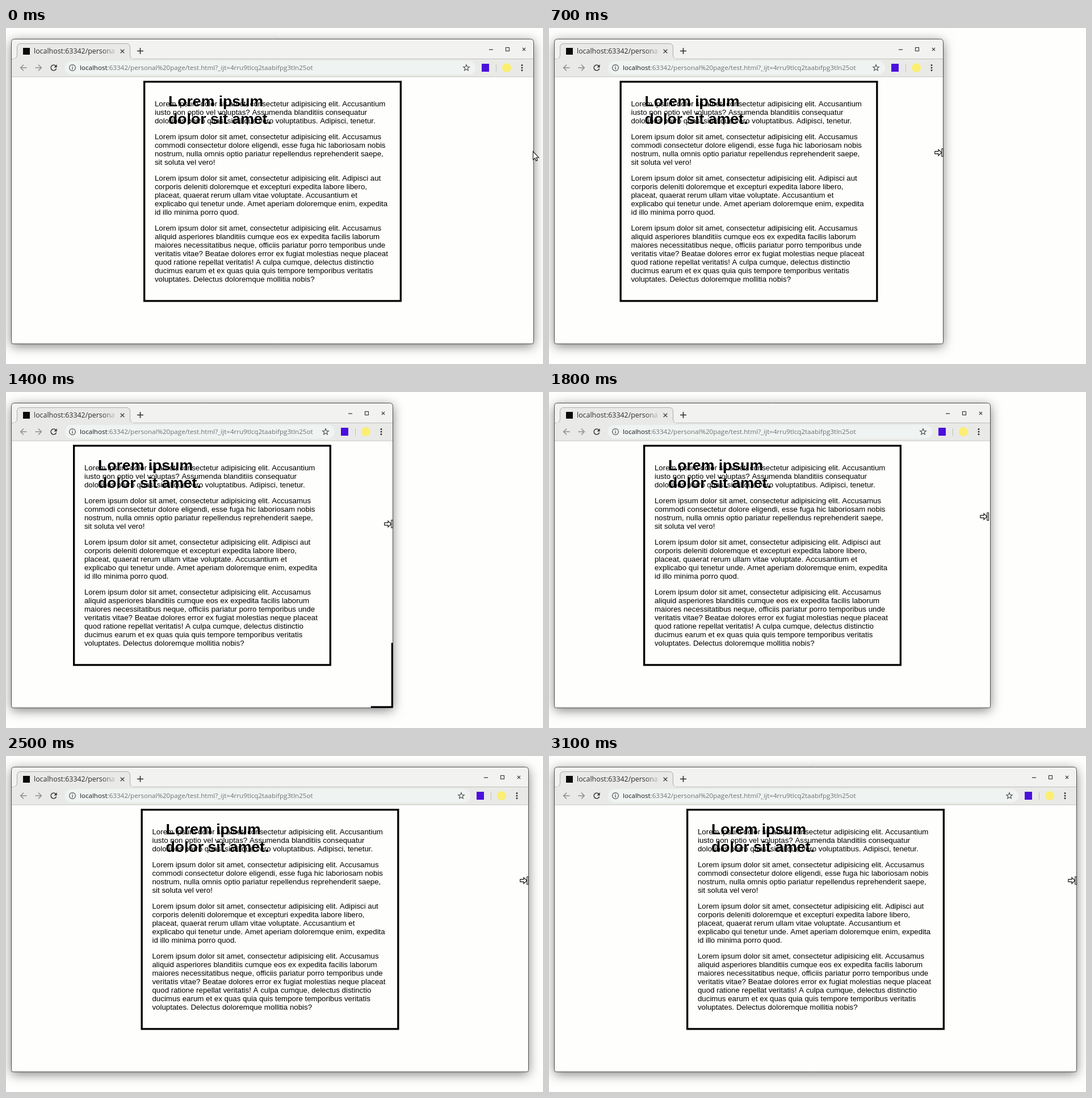
Recreate the animation shown at these times as an HTML page with a canvas. Size 946 by 592 pixels, loop 3500 ms.

```html
<!DOCTYPE html>
<html lang="en">
<head>
<meta charset="utf-8">
<title>Resizing a browser window</title>
<style>
html, body { margin: 0; width: 100%; height: 100%; overflow: hidden; background: #fefefd; }
canvas { display: block; }
</style>
</head>
<body>
<canvas id="stage" width="946" height="592"></canvas>
<script>
const c = document.getElementById('stage').getContext('2d');
const LOOP = 3500, STEP = 100;
const LEFT = 10, TOP = 20, BOTTOM = 556;
const ZOOM = 0.832;
const UI = '"Open Sans", "Noto Sans", sans-serif';
const BODY = '"Liberation Sans", Arial, sans-serif';

// Key points of the drag: time, right edge of the window, pointer height
const drag = [
  [400, 930, 219], [700, 695, 219], [1000, 595, 228], [1100, 577, 232],
  [1200, 577, 232], [1400, 682, 232], [1800, 778, 219], [2200, 888, 215],
  [2500, 921, 219], [2700, 926, 219], [2800, 926, 219], [3100, 930, 219]
];

const paragraphs = [
  ['Lorem ipsum dolor sit amet, consectetur adipisicing elit. Accusantium',
   'iusto non optio vel voluptas? Assumenda blanditiis consequatur',
   'doloribus porro quasi similique vero voluptatibus. Adipisci, tenetur.'],
  ['Lorem ipsum dolor sit amet, consectetur adipisicing elit. Accusamus',
   'commodi consectetur dolore eligendi, esse fuga hic laboriosam nobis',
   'nostrum, nulla omnis optio pariatur repellendus reprehenderit saepe,',
   'sit soluta vel vero!'],
  ['Lorem ipsum dolor sit amet, consectetur adipisicing elit. Adipisci aut',
   'corporis deleniti doloremque et excepturi expedita labore libero,',
   'placeat, quaerat rerum ullam vitae voluptate. Accusantium et',
   'explicabo qui tenetur unde. Amet aperiam doloremque enim, expedita',
   'id illo minima porro quod.'],
  ['Lorem ipsum dolor sit amet, consectetur adipisicing elit. Accusamus',
   'aliquid asperiores blanditiis cumque eos ex expedita facilis laborum',
   'maiores necessitatibus neque, officiis pariatur porro temporibus unde',
   'veritatis vitae? Beatae dolores error ex fugiat molestias neque placeat',
   'quod ratione repellat veritatis! A culpa cumque, delectus distinctio',
   'ducimus earum et ex quas quia quis tempore temporibus veritatis',
   'voluptates. Delectus doloremque mollitia nobis?']
];

// Linear interpolation of one column of the drag keys
function dragAt(t, column) {
  const next = drag.findIndex(key => key[0] > t);
  if (next === 0) return drag[0][column];
  if (next < 0) return drag.at(-1)[column];
  const a = drag[next - 1], b = drag[next];
  return Math.round(a[column] + (b[column] - a[column]) * (t - a[0]) / (b[0] - a[0]));
}

// The pointer first trails, then leads the edge while the window grows
function pointerLead(t) {
  const p = (t - 1400) / 1000;
  return p > 0 && p < 1 ? Math.round(-5 * Math.sin(p * Math.PI * 2)) : 0;
}

function rect(x, y, w, h, color) {
  c.fillStyle = color;
  c.fillRect(x, y, w, h);
}

function text(str, x, y, font, color) {
  c.font = font;
  c.fillStyle = color;
  c.fillText(str, x, y);
}

function line(color, width, ...pts) {
  c.beginPath();
  pts.forEach(([x, y]) => c.lineTo(x, y));
  c.strokeStyle = color;
  c.lineWidth = width;
  c.stroke();
}

function polygon(pts, fill, stroke, width = 1) {
  c.beginPath();
  pts.forEach(([x, y]) => c.lineTo(x, y));
  c.closePath();
  if (fill) { c.fillStyle = fill; c.fill(); }
  if (stroke) { c.strokeStyle = stroke; c.lineWidth = width; c.stroke(); }
}

function disc(x, y, r, color) {
  c.beginPath();
  c.arc(x, y, r, 0, Math.PI * 2);
  c.fillStyle = color;
  c.fill();
}

function cross(x, y, r, color, width) {
  line(color, width, [x - r, y - r], [x + r, y + r]);
  line(color, width, [x - r, y + r], [x + r, y - r]);
}

function outline(right) {
  c.beginPath();
  c.roundRect(LEFT - 0.5, TOP - 0.5, right - LEFT, BOTTOM - TOP + 1, [5, 5, 3, 3]);
}

function drawFrame(right) {
  c.save();
  c.shadowColor = 'rgba(0,0,0,0.5)';
  c.shadowBlur = 19;
  c.shadowOffsetY = 4;
  outline(right);
  c.fillStyle = '#fefefd';
  c.fill();
  c.restore();

  c.save();
  outline(right);
  c.clip();
  rect(LEFT, TOP, right - LEFT, 35, '#f2f2f0');
  rect(LEFT, 55, right - LEFT, 31, '#e9eae7');
  line('#bdbdb9', 1, [LEFT, 54.5], [right, 54.5]);
  line('#c4c4c0', 1, [LEFT, 86], [right, 86]);
  line('#e2e2df', 1, [LEFT, 554.5], [right, 554.5]);
  c.restore();

  outline(right);
  c.strokeStyle = '#50504e';
  c.lineWidth = 1;
  c.stroke();
}

function drawTab() {
  c.beginPath();
  c.moveTo(12, 55);
  c.quadraticCurveTo(19.5, 54, 19.5, 47);
  c.lineTo(19.5, 34);
  c.quadraticCurveTo(19.5, 27.5, 26, 27.5);
  c.lineTo(212, 27.5);
  c.quadraticCurveTo(218.5, 27.5, 218.5, 34);
  c.lineTo(218.5, 47);
  c.quadraticCurveTo(218.5, 54, 225, 55);
  c.fillStyle = '#e9eae7';
  c.fill();
  c.strokeStyle = '#adada9';
  c.lineWidth = 1;
  c.stroke();
  rect(13, 54, 211, 2, '#e9eae7');

  rect(30, 35, 12, 12, '#0a0a0a');
  const fade = c.createLinearGradient(170, 0, 197, 0);
  fade.addColorStop(0, '#2c2c2c');
  fade.addColorStop(1, 'rgba(44,44,44,0)');
  text('localhost:63342/persona', 49, 45, '12.4px ' + UI, fade);
  cross(205, 41, 3.3, '#444', 1.4);
  line('#333', 1.6, [231, 40.5], [242, 40.5]);
  line('#333', 1.6, [236.5, 35], [236.5, 46]);
}

function drawArrow(x, dir) {
  line('#8c8d8b', 1.5, [x - 5.5 * dir, 70], [x + 5 * dir, 70]);
  line('#8c8d8b', 1.5, [x, 64.8], [x + 5.3 * dir, 70], [x, 75.2]);
}

function drawToolbar(right) {
  drawArrow(31, -1);
  drawArrow(57, 1);

  c.beginPath();
  c.arc(84, 70, 4.8, -0.65, -Math.PI * 2 + 0.3, true);
  c.strokeStyle = '#333';
  c.lineWidth = 1.6;
  c.stroke();
  polygon([[89.6, 64.2], [89.6, 69.4], [84.6, 69.4]], '#333');

  c.beginPath();
  c.roundRect(104, 58, right - 103 - 104, 24, 12);
  c.fillStyle = '#eff3f1';
  c.fill();

  c.beginPath();
  c.arc(117, 70, 5.4, 0, Math.PI * 2);
  c.strokeStyle = '#555';
  c.lineWidth = 1.2;
  c.stroke();
  rect(116.4, 69, 1.3, 4, '#555');
  rect(116.4, 66.7, 1.3, 1.3, '#555');

  const host = 'localhost', font = '11.6px ' + UI;
  text(host, 130, 74, font, '#1c1c1c');
  const x = 130 + c.measureText(host).width;
  text(':63342/personal%20page/test.html?_ijt=4rru9tlcq2taabifpg3tln25ot', x, 74, font, '#707271');

  const star = [];
  for (let i = 0; i < 10; i++) {
    const a = -Math.PI / 2 + i * Math.PI / 5, r = i % 2 ? 2.5 : 5.6;
    star.push([right - 119 + r * Math.cos(a), 70.3 + r * Math.sin(a)]);
  }
  polygon(star, null, '#555', 1.2);

  rect(right - 92, 63, 13, 14, '#4a10dc');
  rect(right - 67, 64, 1, 13, '#bfc0bd');
  disc(right - 48, 70, 8, '#fbee72');
  for (const y of [65.6, 70, 74.4]) disc(right - 21, y, 1.5, '#333');
}

function drawButtons(right) {
  rect(right - 79, 37.5, 7, 1.2, '#333');
  c.strokeStyle = '#333';
  c.lineWidth = 1.1;
  c.strokeRect(right - 49.5, 34.5, 6, 6);
  cross(right - 17.5, 37.5, 2.6, '#333', 1.2);
}

function drawPage(right) {
  const width = 455, height = 389.6, border = 4 * ZOOM;
  const left = (right + LEFT) / 2 - 228;
  c.strokeStyle = '#000';
  c.lineWidth = border;
  c.strokeRect(left + border / 2, 93 + border / 2, width - border, height - border);

  const plain = 16 * ZOOM + 'px ' + BODY;
  let y = 137.6;
  for (const lines of paragraphs) {
    for (const str of lines) {
      text(str, left + 24 * ZOOM, y, plain, '#000');
      y += 18 * ZOOM;
    }
    y += 16 * ZOOM;
  }
  const bold = 'bold ' + 32 * ZOOM + 'px ' + BODY;
  text('Lorem ipsum', left + 44, 138.2, bold, '#000');
  text('dolor sit amet.', left + 44, 169, bold, '#000');
}

// Every eighth step of growth shows a strip that is not yet repainted
function drawGap(t, right) {
  const growth = right - dragAt(t - STEP, 1);
  if (growth <= 0 || t / STEP % 8 !== 6) return;
  const spread = Math.max(0, 1.4 * (growth - 24));
  rect(right - 3.3, 442, 3.3, BOTTOM - 442, '#000');
  rect(right - spread, BOTTOM - 2.5, spread, 3, '#000');
}

function drawPointer(x, y) {
  c.save();
  c.translate(x, y);
  polygon([[0, 0], [0, 14.5], [3.2, 11.7], [5.4, 16.6], [7.8, 15.5], [5.6, 10.8], [10, 10.6]],
    '#fff', '#222', 1.2);
  c.restore();
}

function drawResizer(right, y) {
  c.save();
  c.translate(right - 16, y + 0.5);
  polygon([[12.8, -6.8], [15.4, -6.8], [15.4, 6.8], [12.8, 6.8]], '#fff', '#111', 1.1);
  polygon([[0.8, -2.2], [7, -2.2], [7, -5.4], [12.6, 0], [7, 5.4], [7, 2.2], [0.8, 2.2]],
    '#fff', '#111', 1.2);
  c.restore();
}

function draw(time) {
  const t = Math.floor(time / STEP) * STEP;
  const right = dragAt(t, 1);
  rect(0, 0, 946, 592, '#fefefd');
  drawFrame(right);
  drawTab();
  drawToolbar(right);
  drawButtons(right);
  drawPage(right);
  drawGap(t, right);
  if (t < 200) drawPointer(928.5, 217.5);
  else drawResizer(right + pointerLead(t), dragAt(t, 2));
}

const origin = performance.now();
function tick() {
  draw((performance.now() - origin) % LOOP);
  requestAnimationFrame(tick);
}
tick();
</script>
</body>
</html>
```
